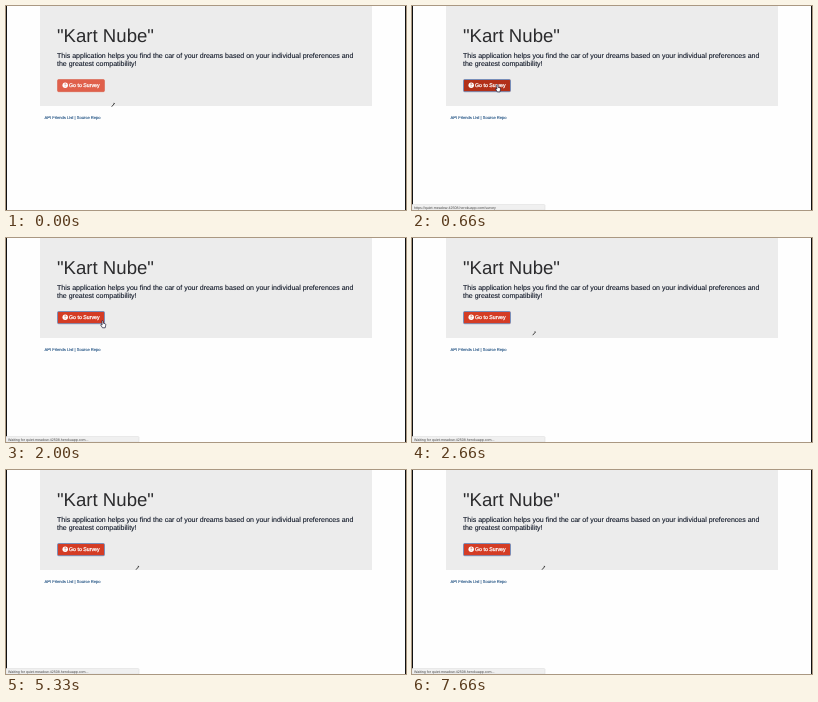
Write an HTML page that moves like this. It is 400 by 204 pixels and loops after 8 s.

```html
<!DOCTYPE html>
<html lang="en">
<head>
<meta charset="utf-8">
<title>Car survey</title>
<style>
  html, body { margin: 0; width: 100%; height: 100%; overflow: hidden; background: #fefefe; }
  svg { display: block; width: 400px; height: 204px; font-family: "Liberation Sans", Arial, sans-serif; text-rendering: geometricPrecision; }
</style>
</head>
<body>
<svg viewBox="0 0 400 204">
  <rect width="400" height="204" fill="#fefefe"/>
  <rect x="34" width="332" height="100" fill="#ececec"/>
  <path d="M.5 0V204M399.5 0V204" stroke="#111"/>

  <text x="51" y="36.4" font-size="18.6" fill="#2b2b2d">"Kart Nube"</text>
  <g font-size="7.02" fill="#0c1424" stroke="#0c1424" stroke-width=".1">
    <text x="51" y="52">This application helps you find the car of your dreams based on your individual preferences and</text>
    <text x="51" y="59.5">the greatest compatibility!</text>
  </g>

  <rect id="button" x="51.5" y="73.5" width="47" height="12.2" rx="1.2"/>
  <circle cx="59.2" cy="79.2" r="2.7" fill="#fff"/>
  <path id="mark" d="M58.4 78.2q.9-1 1.5 0q0 .7-.7 1.2M59.2 80.3v.5" fill="none" stroke-width=".7"/>
  <text x="63" y="81.3" font-size="5.25" fill="#fff" stroke="#fff" stroke-width=".25">Go to Survey</text>

  <text x="38.5" y="113.3" font-size="4.1" fill="#1d4f80" stroke="#1d4f80" stroke-width=".1">API Friends List | Source Repo</text>

  <g id="status">
    <path d="M0 198.5H132q1 0 1 1V204H0z" fill="#f0f0f0" stroke="#dadada" stroke-width=".5"/>
    <text id="message" x="2" y="202.5" font-size="3.6" fill="#444"></text>
  </g>

  <path id="arrow" d="M-1.3 2.2L1.3-.8M.5-1.2l1.2.2" fill="none" stroke="#2a2a2a" stroke-width=".9"/>
  <path id="hand" d="M-1.3-3.4q.8-.7 1.2.2l.3 2.2 1.9.6q.6.3.4 1.4l-.5 2.6h-2.7l-1.7-2.6q-.2-.9.8-.5l.5.3z"
        fill="#fff" stroke="#151530" stroke-width=".7" stroke-linejoin="round"/>
</svg>
<script>
const LOOP = 8000;
const host = "quiet-meadow-42508.herokuapp.com";
const link = `https://${host}/survey`;
const waiting = `Waiting for ${host}...`;
const idle = "#e0604b", hover = "#d43c25", pressed = "#b23019";

// start ms, cursor shape, x, y, button colour, focused, status message
const states = [
  [0, "arrow", 107, 98.5, idle, false, ""],
  [330, "hand", 86, 82, hover, false, ""],
  [660, "hand", 86, 82.3, pressed, true, link],
  [1000, "hand", 87, 81.8, hover, true, link],
  [1660, "hand", 88, 82, hover, true, waiting],
  [2000, "hand", 97.2, 86.2, hover, true, waiting],
  [2330, "arrow", 122, 95, hover, true, waiting],
  [3330, "arrow", 131.3, 97.5, hover, true, waiting]
];

const $ = id => document.getElementById(id);
const show = (el, on) => el.setAttribute("visibility", on ? "visible" : "hidden");

function draw(now) {
  const t = now % LOOP;
  const [, shape, x, y, color, focused, message] = states.findLast(s => s[0] <= t);
  for (const id of ["arrow", "hand"]) show($(id), id === shape);
  $(shape).setAttribute("transform", `translate(${x} ${y})`);
  $("button").setAttribute("fill", color);
  $("button").setAttribute("stroke", focused ? "#6f8fc0" : "#d5553f");
  $("button").setAttribute("stroke-width", focused ? .9 : .5);
  $("mark").setAttribute("stroke", color);
  show($("status"), message);
  $("message").textContent = message;
}

const start = performance.now();
function tick() {
  draw(performance.now() - start);
  requestAnimationFrame(tick);
}
tick();
</script>
</body>
</html>
```
